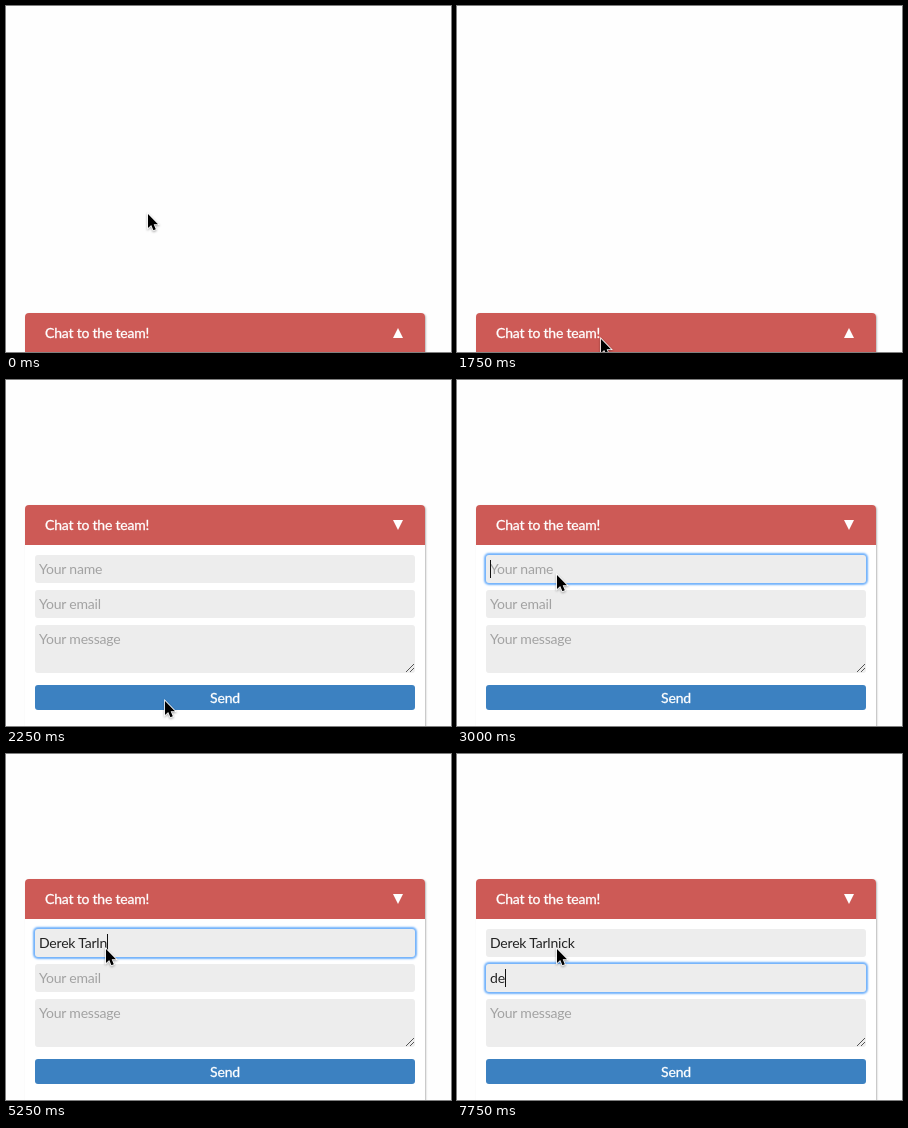
Write an HTML page that moves like this. It is 445 px wide and 346 px high and loops after 8 s.

```html
<!DOCTYPE html>
<html lang="en">
<head>
<meta charset="utf-8">
<title>Chat box</title>
<style>
  html, body { margin: 0; width: 100%; height: 100%; overflow: hidden; background: #fefefe; }
  body { position: relative; font: 14px/28px Lato, sans-serif; letter-spacing: -.2px; }
  #panel {
    position: absolute; left: 19px; width: 400px; height: 240px;
    border-radius: 4px 4px 0 0; background: #fff; box-shadow: 1px 1px 2px rgba(0, 0, 0, .28);
  }
  header {
    height: 40px; padding-left: 20px; line-height: 40px; border-radius: 4px 4px 0 0;
    background: #cd5a56; color: #fff; -webkit-text-stroke: .3px #fff;
  }
  #arrow { position: absolute; left: 368px; top: 15px; width: 10px; height: 10px; background: #fff; }
  .field {
    position: absolute; left: 10px; width: 376px; height: 28px; padding-left: 4px;
    border-radius: 3px; background: #ededed; color: #222; white-space: pre;
  }
  .field.focus { box-shadow: 0 0 2px 2px #70b1fb; }
  .field label { position: absolute; left: 4px; color: #a2a2a2; }
  .caret { position: absolute; top: 5px; height: 18px; border-left: 1px solid #111; }
  #name { top: 50px; }
  #email { top: 85px; }
  #message { top: 120px; height: 48px; }
  #grip { position: absolute; right: 1px; bottom: 1px; }
  #send {
    position: absolute; left: 10px; top: 180px; width: 380px; height: 25px; line-height: 25px;
    border-radius: 3px; background: #3c81c1; color: #fff; text-align: center;
    -webkit-text-stroke: .3px #fff;
  }
  #pointer { position: absolute; left: 0; top: 0; overflow: visible; filter: drop-shadow(0 1px 1px rgba(0, 0, 0, .35)); }
</style>
</head>
<body>
<div id="panel">
  <header>Chat to the team!</header>
  <div id="arrow"></div>
  <div class="field" id="name"><label>Your name</label><span></span><i class="caret"></i></div>
  <div class="field" id="email"><label>Your email</label><span></span><i class="caret"></i></div>
  <div class="field" id="message"><label>Your message</label><svg id="grip" width="8" height="8" stroke="#555"><path d="M0 8L8 0M4 8L8 4"/></svg></div>
  <div id="send">Send</div>
</div>
<svg id="pointer" width="12" height="18">
  <path d="M0 0V14L3.2 11L5.4 16.2L7.8 15.2L5.7 10.2H10Z" fill="#000" stroke="#fff" stroke-width="1.6" paint-order="stroke"/>
</svg>
<script>
const STEP = 250, LOOP = 8000;
const FULL_NAME = 'Derek Tarlnick', EMAIL = 'de';
const CLOSED = 307, OPEN = 125;
const POINTER = [
  [142, 208], [146, 214], [156, 238], [160, 272], [153, 310], [145, 331], [145, 331],
  [144, 333], [149, 336], [159, 321], [136, 252], [104, 197], [100, 195]
];
const $ = id => document.getElementById(id);
const clamp = (v, lo, hi) => Math.min(hi, Math.max(lo, v));

function setField(id, text, focused, caretOn) {
  const field = $(id);
  field.classList.toggle('focus', focused);
  field.querySelector('label').hidden = text !== '';
  field.querySelector('label').style.display = text ? 'none' : '';
  field.querySelector('span').textContent = text;
  field.querySelector('.caret').style.display = focused && caretOn ? '' : 'none';
}

function draw(step) {
  const slide = clamp((step - 7) / 2, 0, 1);
  $('panel').style.top = CLOSED + (OPEN - CLOSED) * slide + 'px';
  $('arrow').style.clipPath = slide < 1
    ? 'polygon(50% 0, 100% 100%, 0 100%)' : 'polygon(0 0, 100% 0, 50% 100%)';

  const [x, y] = POINTER[Math.min(step, POINTER.length - 1)];
  $('pointer').style.transform = `translate(${x}px, ${y}px)`;

  // The name is typed evenly over nine steps
  const typed = Math.round(clamp((step - 14) / 9, 0, 1) * FULL_NAME.length);
  setField('name', FULL_NAME.slice(0, typed), step >= 12 && step < 25, step !== 14);
  setField('email', EMAIL.slice(0, clamp(step - 29, 0, 2)), step >= 25, step < 27 || step > 28);
}

function tick() {
  draw(Math.floor(performance.now() % LOOP / STEP));
  requestAnimationFrame(tick);
}
tick();
</script>
</body>
</html>
```
